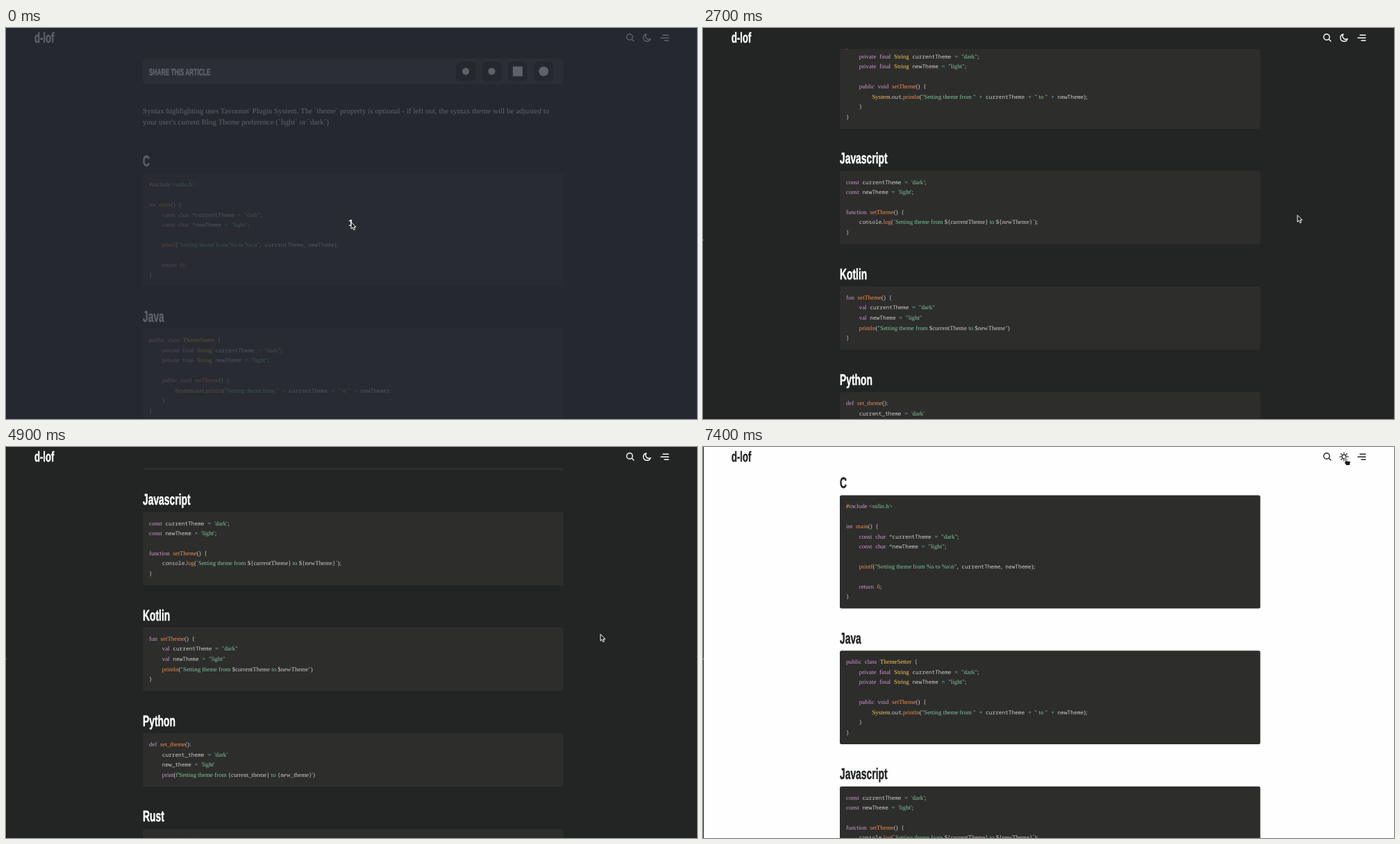
An HTML page that plays this animation: 995 px wide and 563 px high, repeating every 8000 ms.

```html
<!DOCTYPE html>
<html lang="en">
<head>
<meta charset="utf-8">
<title>Syntax highlighting</title>
<style>
  html, body { margin: 0; width: 100%; height: 100%; overflow: hidden; background: #222524; }
  svg { display: block; width: 995px; height: 563px; --bg: #222524; --fg: #fff; }
  svg.light { --bg: #fefefe; --fg: #222524; }
  text { white-space: pre; text-rendering: geometricPrecision; }
  .bg { fill: var(--bg); }
  .fg { fill: var(--fg); }
  .title { font-family: "Liberation Sans", Arial, sans-serif; font-weight: 700; fill: var(--fg); stroke: var(--fg); stroke-width: .5; }
  .intro { font: 11.05px "Liberation Serif", serif; fill: var(--fg); }
  .code { font: 8.9px "Liberation Serif", serif; }
  .icon { fill: none; stroke: var(--fg); stroke-width: 1.4; stroke-linecap: round; stroke-linejoin: round; }
  .pointer { fill: #1b1b1b; stroke: #fff; stroke-width: 1; stroke-linejoin: round; }
  .k { fill: #cc99cd; }
  .s { fill: #7ec699; }
  .f { fill: #f08d49; }
  .c { fill: #f8c555; }
  .o { fill: #67cdcc; }
  .p { fill: #ccc; }
  .m { fill: #ccc; font: 7.8px "Noto Sans Mono", "DejaVu Sans Mono", monospace; }
</style>
</head>
<body>
<svg id="stage" viewBox="0 0 995 563">
  <rect class="bg" width="995" height="563"/>
  <g id="page"></g>
  <rect class="bg" width="995" height="30"/>
  <g id="header">
    <g class="icon">
      <circle cx="898" cy="13" r="4.2"/>
      <path d="M901.2 16.2L904 19"/>
      <path id="moon" d="M922 9a5.2 5.2 0 1 0 6 6.5a4.5 4.5 0 0 1-6-6.5z"/>
      <g id="sun"><circle cx="923" cy="14" r="3"/></g>
      <path d="M946 10.3H954M943 14.2H954M948 18H954"/>
    </g>
  </g>
  <rect width="1" height="563" fill="#1c1f1e"/>
  <rect y="304.500" width="1" height="1.500" fill="#777"/>
  <g id="veil">
    <rect width="995" height="563" fill="#272a34" opacity=".74"/>
    <text x="496.500" y="285" text-anchor="middle" fill="#fff" font-family="Liberation Sans, sans-serif" font-weight="700" font-size="13">1</text>
  </g>
  <g id="cursor" class="pointer">
    <path id="arrow" d="M.5.5V10.200L2.700 8.100L4.300 11.700L6 10.900L4.500 7.500H7.400z"/>
    <path id="hand" d="M1.600 1.400Q2.500.2 3.400 1.400V4.700L8.400 5.500Q9.500 5.900 9.300 7L8.500 11.500H3.200L.4 7.600Q.2 6.300 1.600 6.700z"/>
  </g>
</svg>
<script>
const LOOP = 8000, TICK = 100;
const LEFT = 197, WIDTH = 605.5;
const $ = id => document.getElementById(id);
const stage = $('stage'), page = $('page'), header = $('header');

function add(parent, tag, attrs, content) {
  const el = document.createElementNS('http://www.w3.org/2000/svg', tag);
  for (const key in attrs) el.setAttribute(key, attrs[key]);
  if (content !== undefined) el.textContent = content;
  parent.append(el);
  return el;
}

// All titles share one condensed face.
const title = (parent, x, y, size, label) => add(parent, 'text',
  { class: 'title', 'font-size': size, transform: `translate(${x} ${y}) scale(.63 1)` }, label);

// Tokens are split by "|"; the first letter of each is its class.
const samples = {
  C: `c#|kinclude|s <stdio.h>

kint|m |fmain|p()|m |p{
m    |kconst|m |kchar|m |o*|mcurrentTheme |o=|m |s"dark"|p;
m    |kconst|m |kchar|m |o*|mnewTheme |o=|m |s"light"|p;

m    |fprintf|p(|s"Setting theme from %s to %s\\n"|p,|m currentTheme|p,|m newTheme|p);

m    |kreturn|m |f0|p;
p}`,
  Java: `kpublic|m |kclass|m |cThemeSetter|m |p{
m    |kprivate|m |kfinal|m |cString|m currentTheme |o=|m |s"dark"|p;
m    |kprivate|m |kfinal|m |cString|m newTheme |o=|m |s"light"|p;

m    |kpublic|m |kvoid|m |fsetTheme|p()|m |p{
m        |cSystem|p.|mout|p.|fprintln|p(|s"Setting theme from "|m |o+|m currentTheme |o+|m |s" to "|m |o+|m newTheme|p);
m    |p}
p}`,
  Javascript: `kconst|m currentTheme |o=|m |s'dark'|p;
kconst|m newTheme |o=|m |s'light'|p;

kfunction|m |fsetTheme|p()|m |p{
m    console|p.|flog|p(|s\`Setting theme from |p\${currentTheme}|s to |p\${newTheme}|s\`|p);
p}`,
  Kotlin: `kfun|m |fsetTheme|p()|m |p{
m    |kval|m currentTheme |o=|m |s"dark"
m    |kval|m newTheme |o=|m |s"light"
m    |fprintln|p(|s"Setting theme from |p$currentTheme|s to |p$newTheme|s"|p)
p}`,
  Python: `kdef|m |fset_theme|p():
m    current_theme |o=|m |s'dark'
m    new_theme |o=|m |s'light'
m    |kprint|p(|sf'Setting theme from |p{current_theme}|s to |p{new_theme}|s'|p)`,
  Rust: `kfn|m |fset_theme|p()|m |p{
m    |klet|m current_theme |o=|m |s"dark"|p;
m    |klet|m new_theme |o=|m |s"light"|p;
m    |cprintln!|p(|s"Setting theme from {} to {}"|p,|m current_theme|p,|m new_theme|p);
p}`
};

function buildSample(name, source, top) {
  title(page, LEFT, top - 10.6, 22, name);
  const box = add(page, 'rect', { x: LEFT, y: top, width: WIDTH, rx: 2.5, fill: '#2d2d2c' });
  let y = top + 18.7, last = y;
  for (const line of source.split('\n')) {
    if (line) {
      const row = add(page, 'text', { class: 'code', x: 206, y });
      for (const token of line.split('|')) add(row, 'tspan', { class: token[0] }, token.slice(1));
      last = y;
    }
    y += line ? 14.6 : 14.1;
  }
  const height = last - top + 14.3;
  box.setAttribute('height', height);
  return top + height + 60.8;
}

function buildPage() {
  add(page, 'rect', { x: LEFT, y: 44, width: WIDTH, height: 37, rx: 6, fill: '#393b3a' });
  title(page, 206, 67.7, 13.2, 'SHARE THIS ARTICLE');
  for (let i = 0; i < 4; i++) {
    const cx = 662 + i * 37.4, cy = 62.4;
    add(page, 'rect', { x: cx - 14, y: cy - 14, width: 28, height: 28, rx: 6, class: 'bg' });
    if (i === 2) add(page, 'rect', { x: cx - 7, y: cy - 7, width: 14, height: 14, class: 'fg' });
    else add(page, 'circle', { cx, cy, r: i === 3 ? 7 : 5, class: 'fg' });
  }
  [
    "Syntax highlighting uses Tavornus' Plugin System. The `theme` property is optional - if left out, the syntax theme will be adjusted to",
    "your user's current Blog Theme preference (`light` or `dark`)"
  ].forEach((line, i) => add(page, 'text', { class: 'intro', x: LEFT, y: 123.3 + i * 15.4 }, line));
  let top = 209.6;
  for (const name in samples) top = buildSample(name, samples[name], top);
  title(page, 128, 1245, 17.3, 'Related articles');
}

function buildHeader() {
  title(header, 41, 20.5, 20.8, 'd-lof');
  for (let i = 0; i < 8; i++)
    add($('sun'), 'path', { d: 'M928 14H928.9', transform: `rotate(${i * 45} 923 14)` });
}

// Wheel bursts: start time, then the scroll offset at each tick.
const bursts = [
  [1500, 8, 56, 68, 70],
  [2100, 78, 150, 228, 290, 350, 404, 423],
  [3000, 431, 488, 556, 618, 670, 700, 708],
  [4300, 700, 652, 638],
  [4700, 630, 585, 535, 480, 425, 370, 325, 298, 283],
  [5600, 275, 215, 152, 140]
];

function scrollAt(time) {
  let offset = 0;
  for (const [start, ...steps] of bursts) {
    if (time < start) break;
    offset = steps[Math.min((time - start) / TICK, steps.length - 1)];
  }
  return offset;
}

const smooth = p => p * p * (3 - 2 * p);
const progress = (time, start, steps) =>
  smooth(Math.max(0, Math.min(1, (time - start + TICK) / (steps * TICK))));

function cursorAt(time) {
  const a = progress(time, 500, 7), b = progress(time, 6400, 8);
  return {
    x: 496.5 + 359 * a + 67.5 * b,
    y: 279 - 10 * a + 11 * Math.sin(Math.PI * a) - 254 * b
  };
}

const show = (id, visible) => $(id).setAttribute('visibility', visible ? 'visible' : 'hidden');

function render(ms) {
  const time = Math.floor(ms % LOOP / TICK) * TICK;
  const light = time >= 7400;
  const { x, y } = cursorAt(time);
  const hovering = y < 24;
  stage.setAttribute('class', light ? 'light' : '');
  page.setAttribute('transform', `translate(0 ${-scrollAt(time)})`);
  $('cursor').setAttribute('transform', `translate(${x} ${y})`);
  show('veil', time < 100);
  show('moon', !light);
  show('sun', light);
  show('arrow', !hovering);
  show('hand', hovering);
}

buildPage();
buildHeader();
const begin = performance.now();
function loop() {
  render(performance.now() - begin);
  requestAnimationFrame(loop);
}
loop();
</script>
</body>
</html>
```
